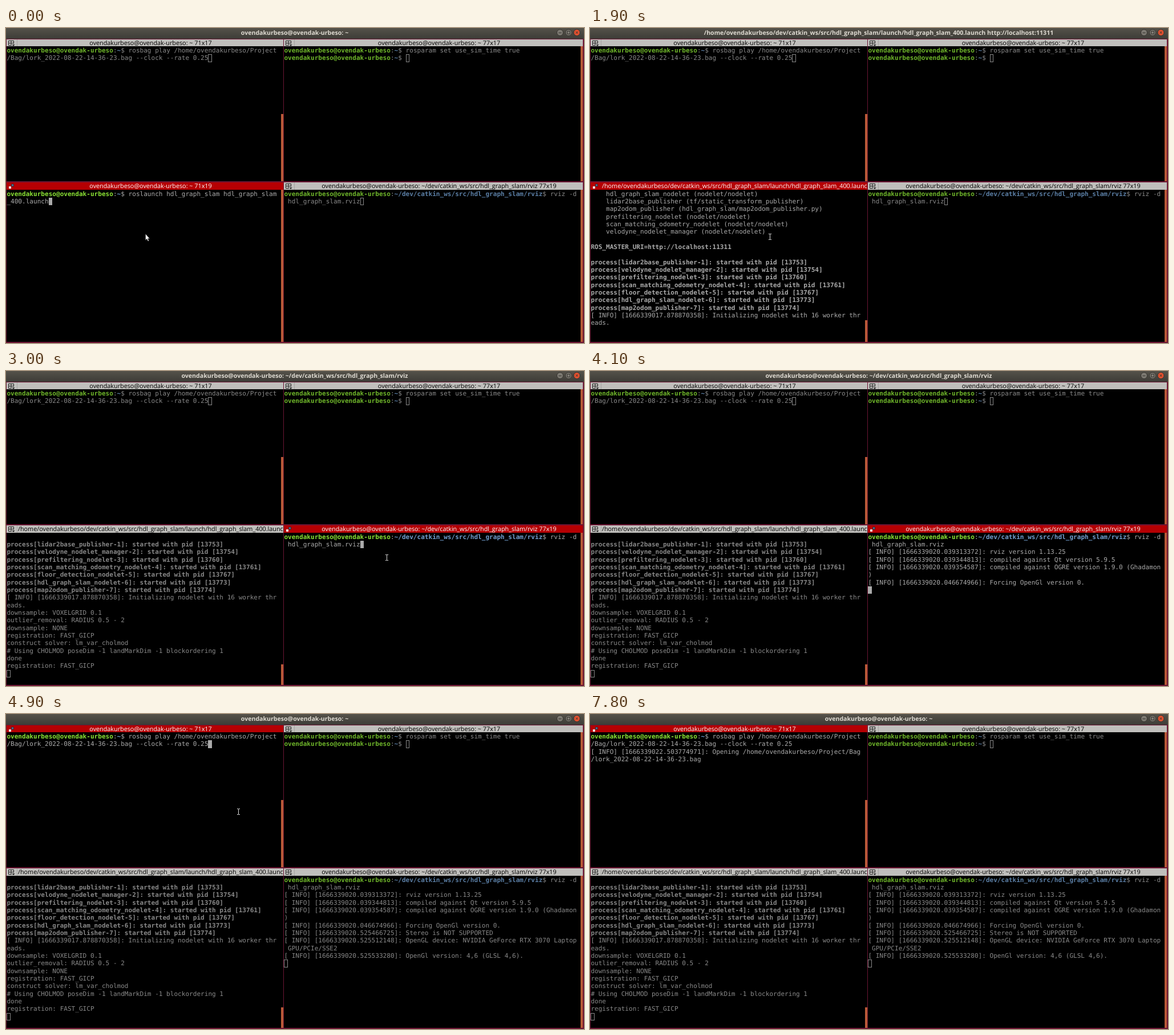
An HTML page that plays this animation: 1013 px wide and 553 px high, repeating every 8 s.

```html
<!DOCTYPE html>
<html lang="en">
<head>
<meta charset="utf-8">
<title>Terminal session</title>
<style>
  html, body { margin: 0; width: 100%; height: 100%; overflow: hidden; background: #6b1533; }
  body { position: relative; font: 10.8px "Open Sans", "Noto Sans", sans-serif; text-rendering: geometricPrecision; }
  div, pre, svg { position: absolute; }
  #bar { left: 0; top: 0; width: 1013px; height: 19px; background: linear-gradient(#55524a, #3d3c37); }
  #title { left: 0; width: 1012px; top: 0; text-align: center; white-space: pre; color: #dfdbd2; font-size: 10.6px; font-weight: 700; line-height: 18px; }
  .pane { background: #000; overflow: hidden; --fg: #888; --green: #6eb52a; --blue: #5b7fa6; }
  .pane.focus { --fg: #aaa; --green: #8ae234; --blue: #729fcf; }
  .head { left: 0; right: 0; top: 0; height: 12.5px; background: #c0bfbc; color: #000; }
  .focus .head { background: #b50003; color: #fff; }
  .name { left: 18px; right: 0; height: 13px; padding-left: 1px; line-height: 13px; overflow: hidden; white-space: pre; text-align: center; border-left: 1px solid #0002; }
  .focus .name { border-color: transparent; }
  .head svg { left: 2px; top: 1px; }
  .focus .idle, .pane:not(.focus) .live { display: none; }
  pre { left: .4px; top: 13.6px; margin: 0; color: var(--fg); font: 11.074px/13.333px "DejaVu Sans Mono", monospace; }
  pre .user { color: var(--green); }
  pre .path { color: var(--blue); }
  pre i { display: inline-block; width: 6.667px; height: 13.333px; vertical-align: top; box-shadow: inset 0 0 0 1px var(--fg); }
  .focus pre i { background: var(--fg); }
  .thumb { right: 0; width: 4.5px; bottom: 0; background: #b95a38; }
  #mouse { left: 0; top: 0; }
</style>
</head>
<body>
<div id="bar"></div>
<div id="title"></div>
<svg width="50" height="19" style="left:963px;top:0" fill="none" stroke="#35332f">
  <circle cx="8" cy="8" r="5.5" fill="#7c7971"/><path d="M5.5 8.5h5"/>
  <circle cx="23" cy="8" r="5.5" fill="#7c7971"/><path d="M20.5 5.5h5v5h-5z"/>
  <circle cx="37.5" cy="8" r="5.5" fill="#e4512f"/><path d="M35.5 6l4 4m0-4l-4 4"/>
</svg>
<script>
const LOOP = 8000;
const user = 'ovendakurbeso', host = 'ovendak-urbeso';
const home = '/home/' + user, slam = '/dev/catkin_ws/src/hdl_graph_slam';
const bag = 'lork_2022-08-22-14-36-23.bag';
const shellTitle = `${user}@${host}: ~`;
const rvizTitle = shellTitle + slam + '/rviz';
const launchTitle = `${home}${slam}/launch/hdl_graph_slam_400.launch`;

const prompt = (path, command) =>
  `<b class="user">${user}@${host}</b>:<b class="path">~${path}</b>$ ${command}`;
const info = (stamp, text) => `[ INFO] [1666339${stamp}]: ${text}`;
const started = (name, i) =>
  `<b>process[${name}-${i + 1}]: started with pid [${[13753, 13754, 13760, 13761, 13767, 13773, 13774][i]}]</b>`;

const playLog = [
  prompt('', `rosbag play ${home}/Project`),
  `/Bag/${bag} --clock --rate 0.25`,
  info('022.503774971', `Opening ${home}/Project/Bag`),
  '/' + bag];

const launchLog = [
  prompt('', 'roslaunch hdl_graph_slam hdl_graph_slam'),
  '_400.launch',
  `... logging to ${home}/.ros/log/d59d12fc-5115-11ed-9e05-103`,
  `d1c9df9ea/roslaunch-${host}-13723.log`,
  'Checking log directory for disk usage. This may take a while.',
  'Press Ctrl-C to interrupt',
  'Done checking log file disk usage. Usage is &lt;1GB.',
  '',
  ' * /prefiltering_nodelet/downsample_resolution: 0.1',
  ' * /rosdistro: melodic',
  ' * /rosversion: 1.14.13',
  ' * /scan_matching_odometry_nodelet/downsample_method: NONE',
  ' * /use_sim_time: True',
  '',
  'NODES',
  '  /',
  '    floor_detection_nodelet (nodelet/nodelet)',
  '    hdl_graph_slam_nodelet (nodelet/nodelet)',
  '    lidar2base_publisher (tf/static_transform_publisher)',
  '    map2odom_publisher (hdl_graph_slam/map2odom_publisher.py)',
  '    prefiltering_nodelet (nodelet/nodelet)',
  '    scan_matching_odometry_nodelet (nodelet/nodelet)',
  '    velodyne_nodelet_manager (nodelet/nodelet)',
  '',
  '<b>ROS_MASTER_URI=http://localhost:11311</b>',
  '',
  ...['lidar2base_publisher', 'velodyne_nodelet_manager', 'prefiltering_nodelet',
    'scan_matching_odometry_nodelet', 'floor_detection_nodelet',
    'hdl_graph_slam_nodelet', 'map2odom_publisher'].map(started),
  info('017.878870358', 'Initializing nodelet with 16 worker thr'),
  'eads.',
  'downsample: VOXELGRID 0.1',
  'outlier_removal: RADIUS 0.5 - 2',
  'downsample: NONE',
  'registration: FAST_GICP',
  'construct solver: lm_var_cholmod',
  '# Using CHOLMOD poseDim -1 landMarkDim -1 blockordering 1',
  'done',
  'registration: FAST_GICP'];

const rvizLog = [
  prompt(slam + '/rviz', 'rviz -d'),
  ' hdl_graph_slam.rviz',
  info('020.039313372', 'rviz version 1.13.25'),
  info('020.039344813', 'compiled against Qt version 5.9.5'),
  info('020.039354587', 'compiled against OGRE version 1.9.0 (Ghadamon'),
  ')',
  info('020.046674966', 'Forcing OpenGl version 0.'),
  info('020.525466725', 'Stereo is NOT SUPPORTED'),
  info('020.525512148', 'OpenGL device: NVIDIA GeForce RTX 3070 Laptop'),
  ' GPU/PCIe/SSE2',
  info('020.525533280', 'OpenGl version: 4,6 (GLSL 4,6).')];

const paramLog = [prompt('', 'rosparam set use_sim_time true'), prompt('', '')];

// Every track is a list of [start time, value...] steps.
const panes = [
  { x: 1, y: 19.5, w: 485, h: 249.5, log: playLog, enter: 6000, rows: [[0, 2], [6600, 4]],
    thumb: [[0, 151]], title: [[0, shellTitle + ' 71x17']] },
  { x: 487, y: 19.5, w: 524, h: 249.5, log: paramLog, enter: LOOP, rows: [[0, 2]],
    thumb: [[0, 32]], title: [[0, shellTitle + ' 77x17']] },
  { x: 1, y: 271.2, w: 485, h: 279.8, log: launchLog, enter: 900,
    rows: [[0, 2], [1100, 6], [1200, 8], [1400, 26], [1900, 35], [2000, 39], [2200, 43]],
    thumb: [[0, 284], [1400, 510], [1900, 513], [2200, 515]],
    title: [[0, shellTitle + ' 71x19'], [1100, launchTitle + ' 71x19']] },
  { x: 487, y: 271.2, w: 524, h: 279.8, log: rvizLog, enter: 4000, rows: [[0, 2], [4100, 7], [4500, 11]],
    thumb: [[0, 284]], title: [[0, rvizTitle + ' 77x19']] }];

const windowTitle = [[0, shellTitle], [1100, launchTitle],
  [1300, launchTitle + ' http://localhost:11311'], [3000, rvizTitle], [4900, shellTitle]];
const focus = [[0, 2], [3000, 3], [4900, 0]];
const blink = [[0, 1], [200, 0], [800, 1], [1500, 0], [2200, 1], [2600, 0], [3000, 1], [3600, 0],
  [4000, 1], [4600, 0], [4900, 1], [5500, 0], [6000, 1], [6600, 0], [7200, 1], [7800, 0]];
const pointer = [[0, 'arrow', 244, 361], [200, 'beam', 245, 363], [900, ''], [1200, 'beam', 245, 363],
  [1300, 'beam', 262, 364], [1400, 'beam', 296, 365], [1500, 'beam', 315, 366], [2000, 'beam', 350, 366],
  [2200, 'beam', 385, 366], [2400, 'beam', 398, 363], [2600, 'beam', 432, 360], [2700, 'beam', 473, 356],
  [2900, 'beam', 590, 338], [3000, 'beam', 667, 327], [4000, ''], [4700, 'beam', 407, 180],
  [4800, 'beam', 407, 171], [6000, '']];
const shapes = {
  '': '',
  arrow: '<path d="M.5 .5v11l2.4-2.2 1.9 4 1.7-.8-1.8-3.8h3.1z" fill="#fff" stroke="#222" stroke-width=".6"/>',
  beam: '<path d="M-2.5 -5h2l.5.5.5-.5h2M0-4.5v9M-2.5 5h2l.5-.5.5.5h2" fill="none" stroke="#ddd"/>' };

const step = (track, t) => track.findLast(s => s[0] <= t);
const value = (track, t) => step(track, t)[1];

for (const p of panes) {
  p.el = document.createElement('div');
  p.el.style.cssText = `left:${p.x}px;top:${p.y}px;width:${p.w}px;height:${p.h}px`;
  p.el.innerHTML = `<div class="head">
    <svg class="idle" width="14" height="12" fill="none" stroke="#222"><path d="M1.5 1.5h9v5M1.5 1.5v8h5M1.5 5.5h9M6 1.5v8"/><path d="M7.5 8h5l-2.5 3z" fill="#222" stroke="none"/></svg>
    <svg class="live" width="14" height="12"><path d="M2 6h4v4h-4z" fill="#eee"/><path d="M6.5 2h4v4h-4z" fill="#4d6c91" stroke="#222" stroke-width=".7"/></svg>
    <div class="name"></div></div><pre></pre><div class="thumb"></div>`;
  document.body.append(p.el);
}
document.body.insertAdjacentHTML('beforeend', '<svg id="mouse" width="1013" height="553"></svg>');
const titleEl = document.getElementById('title'), mouseEl = document.getElementById('mouse');

function draw(t) {
  titleEl.textContent = value(windowTitle, t);
  panes.forEach((p, i) => {
    const focused = value(focus, t) === i;
    const cursor = !focused || value(blink, t) ? '<i></i>' : '';
    const lines = p.log.slice(0, value(p.rows, t)).slice(-18);
    p.el.className = focused ? 'pane focus' : 'pane';
    p.el.querySelector('.name').textContent = value(p.title, t);
    p.el.querySelector('pre').innerHTML = lines.join('\n') + (t < p.enter ? '' : '\n') + cursor;
    p.el.querySelector('.thumb').style.top = value(p.thumb, t) - p.y + 'px';
  });
  const [, shape, x = 0, y = 0] = step(pointer, t);
  const offset = shape === 'beam' ? .5 : 0;
  mouseEl.innerHTML = `<g transform="translate(${x + offset} ${y + offset})">${shapes[shape]}</g>`;
}

let last = -1;
function tick() {
  const t = Math.floor(performance.now() % LOOP / 100) * 100;
  if (t !== last) draw(last = t);
  requestAnimationFrame(tick);
}
tick();
</script>
</body>
</html>
```
